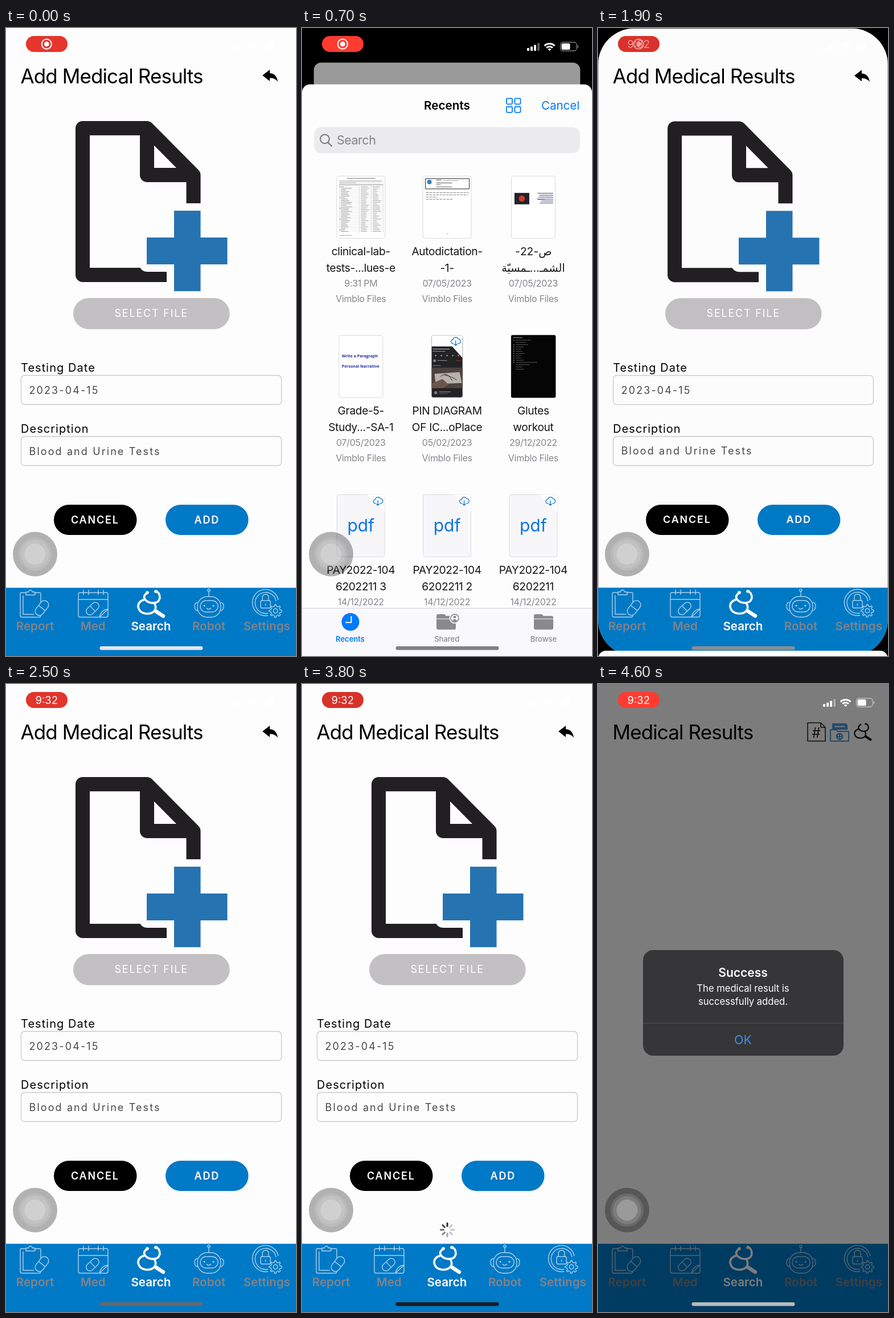
Write an HTML page with a canvas that moves like this. It is 509 px wide and 1100 px high and loops after 4.7 s.

```html
<!DOCTYPE html>
<html lang="en">
<head>
<meta charset="utf-8">
<title>Medical results</title>
<style>
  html, body { margin: 0; width: 100%; height: 100%; overflow: hidden; background: #fefdfe; }
  canvas { display: block; width: 100vw; height: 100vh; }
</style>
</head>
<body>
<canvas id="stage"></canvas>
<script>
const W = 509, H = 1100, LOOP = 4700;
const FONT = "Inter, 'DejaVu Sans', sans-serif";
const PAPER = '#fefdfe', BLUE = '#0079c6', LINK = '#007aff', GREY = '#8a898d';

const canvas = document.getElementById('stage');
const ctx = canvas.getContext('2d');
const dpr = window.devicePixelRatio || 1;
canvas.width = Math.round(W * dpr);
canvas.height = Math.round(H * dpr);

// ---------- helpers ----------
const clamp = v => Math.max(0, Math.min(1, v));
const mix = (a, b, u) => a + (b - a) * u;
const easeInOut = u => u < 0.5 ? 2 * u * u : 1 - 2 * (1 - u) ** 2;
const noise = i => { const v = Math.sin(i * 12.9898) * 43758.5453; return v - Math.floor(v); };
const spring = ms => ms <= 0 ? 0 : 1 - (1 + 0.017 * ms) * Math.exp(-0.017 * ms);

function keyed(t, keys, ease = u => u) {
  for (let i = 1; i < keys.length; i++) {
    const [t0, v0] = keys[i - 1], [t1, v1] = keys[i];
    if (t < t1) return mix(v0, v1, ease(clamp((t - t0) / (t1 - t0))));
  }
  return keys[keys.length - 1][1];
}

function text(str, x, y, size, { color = '#000', weight = 400, align = 'left', gap = 0, font = FONT } = {}) {
  ctx.font = `${weight} ${size}px ${font}`;
  ctx.letterSpacing = gap + 'px';
  ctx.textAlign = align;
  ctx.fillStyle = color;
  ctx.fillText(str, x, y);
}

function paint(path, fill, stroke, lw = 1) {
  if (fill) { ctx.fillStyle = fill; ctx.fill(path); }
  if (stroke) { ctx.strokeStyle = stroke; ctx.lineWidth = lw; ctx.stroke(path); }
}
const shape = (d, fill, stroke, lw) => paint(new Path2D(d), fill, stroke, lw);

function box(x, y, w, h, r, fill, stroke, lw) {
  const p = new Path2D();
  p.roundRect(x, y, w, h, r);
  paint(p, fill, stroke, lw);
}

function disc(x, y, r, fill, stroke, lw) {
  const p = new Path2D();
  p.arc(x, y, r, 0, 7);
  paint(p, fill, stroke, lw);
}

function bar(x, y, w, color, h = 1) {
  ctx.fillStyle = color;
  ctx.fillRect(x, y, w, h);
}

function at(x, y, scale, angle, draw) {
  ctx.save();
  ctx.translate(x, y);
  ctx.scale(scale, scale);
  ctx.rotate(angle);
  draw();
  ctx.restore();
}

// ---------- app screens ----------
function scopeIcon(x, y, scale, color) {
  at(x, y, scale, 0, () => {
    ctx.lineCap = ctx.lineJoin = 'round';
    shape('M-8 -19Q-15 -14 -11 -8Q-5 -1 5 -2Q14 -3 15 -11Q15 -20 8 -23', null, color, 3.6);
    shape('M-12 -8Q-24 -4 -23 5Q-21 16 -8 17Q3 17 7 10Q9 4 5 -2', null, color, 3.6);
    shape('M7 12L21 21', null, color, 6.5);
    disc(-7, -20, 2.8, color);
    disc(8, -22, 2.8, color);
    ctx.lineCap = 'butt';
  });
}

function tabBar() {
  const line = '#a9d0ea', lw = 1.4;
  bar(0, 980.5, W, BLUE, 120);

  shape('M35 989H27Q25 989 25 991V1029Q25 1032 28 1032H58Q61 1032 61 1029V991Q61 989 59 989H51', null, line, lw);
  shape('M35 993V988H39Q43 981 47 988H51V993Z', null, line, lw);
  shape('M30 994V1027H49', null, line, lw);
  at(63, 1016, 1, -0.9, () => {
    box(-14.5, -7.5, 29, 15, 7.5, BLUE, line, lw);
    shape('M0 -7V7', null, line, lw);
  });

  box(127, 989, 52, 43, 3, null, line, lw);
  shape('M127 1001H179M136 984V993M145 984V993M162 984V993M171 984V993M179 1018L164 1032Q167 1019 179 1018', null, line, lw);
  at(152, 1017, 1, -0.75, () => {
    box(-13, -6.5, 26, 13, 6.5, null, line, lw);
    shape('M0 -6V6', null, line, lw);
  });

  scopeIcon(255, 1009, 1, '#fff');

  disc(356, 985, 2, null, line, lw);
  box(336, 996, 41, 36, 17, null, line, lw);
  box(341, 1003, 31, 20, 10, null, line, lw);
  shape('M356 987V996M336 1006Q331 1007 331 1013T336 1021M377 1006Q382 1007 382 1013T377 1021M352 1016Q356 1020 360 1016', null, line, lw);
  disc(348, 1012, 1.6, line);
  disc(364, 1012, 1.6, line);

  shape('M478 1002A23 23 0 1 0 460 1029M474 1004A18.5 18.5 0 1 0 460 1025', null, line, lw);
  box(447, 1003, 17, 13, 2, null, line, lw);
  shape('M450 1003V998Q450 992 455.500 992T461 998V1003M455.500 1008V1012', null, line, lw);
  at(473, 1021, 1, 0, () => {
    const gear = new Path2D();
    for (let i = 0; i <= 64; i++) {
      const a = i / 64 * Math.PI * 2, r = Math.cos(a * 8) > 0 ? 11 : 8.3;
      gear.lineTo(r * Math.cos(a), r * Math.sin(a));
    }
    paint(gear, BLUE, line, lw);
    disc(0, 0, 3.8, null, line, lw);
  });

  ['Report', 'Med', 'Search', 'Robot', 'Settings'].forEach((name, i) =>
    text(name, 51 + i * 101.7, 1055, 20.6, { weight: 600, align: 'center', color: i === 2 ? '#fff' : '#80838a' }));
}

function fileIcon() {
  ctx.lineJoin = 'round';
  shape('M282 432.500H134.500V175.500H247.500L329 257.500V307M247.500 175.500V257.500H329', null, '#221f22', 25);
  shape('M235 419Q239 427 248 427H284V419Z', PAPER);
  bar(295, 320, 46.5, '#2673b2', 141);
  bar(247, 367, 141.5, '#2673b2', 47);
}

function field(label, value, y) {
  text(label, 26, y - 6, 20, { gap: 1.05 });
  box(26.5, y + 0.5, 457, 51, 6, null, '#c9c8cc', 1.3);
  text(value, 40.5, y + 32.5, 18, { gap: 2.1, color: '#48474a' });
}

function spinner(t) {
  const head = 6 + Math.floor((t - 3000) / 80);
  ctx.lineCap = 'round';
  for (let i = 0; i < 8; i++) {
    const age = (((head - i) % 8) + 8) % 8;
    const tone = Math.round(mix(45, 195, Math.min(1, age / 5)));
    at(255, 956, 1, i * Math.PI / 4, () => shape('M0 -6.500V-11.500', null, `rgb(${tone},${tone},${tone})`, 3));
  }
  ctx.lineCap = 'butt';
}

const screenTitle = str => text(str, 25.5, 96.5, 35, { gap: -0.9 });

function formScreen(t) {
  bar(0, 0, W, PAPER, H);
  screenTitle('Add Medical Results');
  shape('M450 83L463 73V79Q475 80 477 94Q472 87 463 87.500V93Z', '#000');
  fileIcon();
  box(118, 473, 274.5, 54.5, 27, '#c2c0c3');
  text('SELECT FILE', 190.5, 506, 18, { gap: 1.8, color: '#fff' });
  field('Testing Date', '2023-04-15', 608);
  field('Description', 'Blood and Urine Tests', 715);

  box(84, 835, 145.5, 53, 26.5, '#000');
  text('CANCEL', 114, 867.5, 18, { gap: 1.8, weight: 600, color: '#fff' });
  ctx.save();
  ctx.globalAlpha = keyed(t, [[2650, 1], [2800, 0.2], [3100, 1]], easeInOut);
  box(280, 835, 145.5, 53, 26.5, BLUE);
  text('ADD', 330.5, 867.5, 18, { gap: 1.8, weight: 600, color: '#fff' });
  ctx.restore();

  if (t >= 2900) spinner(t);
  tabBar();
}

function resultsScreen(t) {
  bar(0, 0, W, PAPER, H);
  screenTitle('Medical Results');

  shape('M368 68H391L399 76V100H368ZM391 68V76H399', null, '#222', 1.6);
  text('#', 383, 94, 24, { align: 'center', color: '#222', font: `${FONT}` });
  const blue = '#4599d6';
  shape('M411 80V69H435L438 72V80Z', blue);
  shape('M415 74.500H433', null, PAPER, 2);
  shape('M408 80H418L421 83H440V100H408Z', null, blue, 2);
  disc(424, 92, 5, null, blue, 2.4);
  shape('M424 88V96M420 92H428', null, blue, 2);
  scopeIcon(465, 84, 0.64, '#1c1a1c');
  tabBar();

  const u = clamp((t - 3950) / 250), a = 1 - (1 - u) ** 3;
  bar(0, 0, W, `rgba(0,0,0,${0.51 * a})`, H);
  ctx.save();
  ctx.globalAlpha = a;
  at(254.5, 558.5, mix(1.15, 1, a), 0, () => {
    ctx.translate(-254.5, -558.5);
    box(79, 466, 352, 185, 18, '#363537');
    const c = { align: 'center', color: '#fff' };
    text('Success', 254.5, 512.5, 21, { ...c, weight: 600 });
    text('The medical result is', 254.5, 539, 16.6, c);
    text('successfully added.', 254.5, 562, 16.6, c);
    bar(79, 593.5, 352, '#59585b');
    text('OK', 254.5, 630.5, 21.5, { ...c, color: '#3f8fe9' });
  });
  ctx.restore();
}

// ---------- file picker ----------
const FILES = [
  ['clinical-lab-', 'tests-...lues-e', '9:31 PM'],
  ['Autodictation-', '-1-', '07/05/2023'],
  ['ص-22-', 'الشمـ...ـمسيّة', '07/05/2023'],
  ['Grade-5-', 'Study...-SA-1', '07/05/2023'],
  ['PIN DIAGRAM', 'OF IC...oPlace', '05/02/2023'],
  ['Glutes', 'workout', '29/12/2022'],
  ['PAY2022-104', '6202211 3', '14/12/2022'],
  ['PAY2022-104', '6202211 2', '14/12/2022'],
  ['PAY2022-104', '6202211', '14/12/2022']
];

// Thumbnails are drawn around x = 0 with y from 0 to 110.
const frame = (w, fill) => box(-w / 2, 0.5, w, 109, 4, fill, '#d9d8dc', 1);

function cloud(x, y) {
  at(x, y, 1, 0, () => {
    ctx.lineCap = 'round';
    shape('M-4 4H-4.500a3.500 3.500 0 0 1 0 -7a4.800 4.800 0 0 1 9 -1.500a4.300 4.300 0 0 1 .5 8.500H4M0 -1V7.500M-2.500 5L0 7.500L2.500 5', null, '#1b7fd6', 1.4);
    ctx.lineCap = 'butt';
  });
}

function labThumb() {
  frame(85, '#fff');
  bar(-25, 4, 50, '#777');
  for (let i = 0; i < 3; i++) bar(-38, 8 + i * 2, i < 2 ? 75 : 30, '#bbb');
  bar(-38, 14, 77, '#cfcfcf', 3);
  for (let i = 0; i < 30; i++) {
    const y = 18 + i * 2.7;
    bar(-38, y, 77, '#e2e2e2', 0.6);
    bar(i % 7 ? -35 : -38, y + 0.8, 8 + 12 * noise(i), '#a2a2a2');
    bar(0, y + 0.8, 8 + 7 * noise(i + 40), '#b2b2b2');
    bar(21, y + 0.8, 6 + 9 * noise(i + 80), '#b2b2b2');
  }
  [-38, -3, 18, 39].forEach(x => bar(x, 14, 0.7, '#d0d0d0', 86));
  bar(-38, 104, 22, '#aaa');
}

function dictationThumb() {
  frame(85, '#fff');
  box(-38, 5, 77, 18, 0, null, '#222', 1);
  disc(-31, 11, 4, '#2f83b8');
  bar(-19, 7, 9, '#555');
  bar(-8, 8, 28, '#777', 0.7);
  bar(-19, 12, 28, '#555');
  bar(-19, 15, 8, '#666');
  bar(-19, 19, 28, '#666');
  [75, 74, 20, 48].forEach((w, i) => {
    for (let x = 0; x < w; x += 6) bar(-37 + x, 29 + i * 3.9, Math.min(4.7, w - x), '#808080');
  });
  bar(0, 101, 2, '#888');
}

function sunThumb() {
  frame(77, '#fff');
  bar(-33, 30, 26, '#252127', 20);
  disc(-20, 40, 5.5, '#c23a30');
  for (let i = 0; i < 6; i++) {
    const w = 18 + 17 * noise(i + 3);
    bar(35 - w, 30 + i * 3.4, w, i % 2 ? '#6268a8' : '#6f6970', 1.3);
  }
  bar(8, 41, 12, '#c55');
}

function paragraphThumb() {
  frame(77, '#fff');
  const style = { weight: 700, color: '#2a2f9e', font: "'Open Sans', sans-serif" };
  text('Write a Paragraph', -33.5, 39, 7, style);
  text('Personal Narrative', -33.5, 57, 7, style);
}

function videoThumb() {
  box(-27.5, 0.5, 55, 109, 3, '#232225', '#d9d8dc', 1);
  shape('M-27 1H27V40L9 20H-27Z', '#fdfdfe');
  bar(-25, 24, 30, '#a8a8a8', 1.2);
  bar(-25, 28, 22, '#8a8a8a', 1.2);
  for (let i = 0; i < 5; i++) disc(-20 + i * 10, 36, 1.3, '#999');
  disc(-22, 45, 2.4, '#8a8a8a');
  bar(-17, 44, 17, '#999');
  bar(16, 44, 8, '#a03030', 1.2);
  bar(-25, 53, 14, '#888');
  bar(-27, 57, 54, '#4d423e', 36);
  shape('M-22 68L22 65L26 84L-20 86Z', '#b9b2ac');
  shape('M-27 85L-8 77L3 87L-7 93H-27Z', '#6d554b');
  shape('M-12 73Q0 62 9 80M-5 70Q10 73 17 79', null, '#383136', 1);
  disc(-20, 101, 2.8, '#777');
  bar(-14, 99, 20, '#999');
  bar(-14, 102, 15, '#666');
  cloud(15, 11);
}

function listThumb() {
  box(-39, 0, 78.5, 110, 3, '#050506');
  bar(-35, 4, 16, '#888', 1.2);
  for (let i = 0; i < 14; i++) {
    const y = 8.5 + i * 3.9;
    if (i !== 1 && i < 11) disc(-34, y + 0.5, 1, '#777');
    bar(-31, y, 9 + 30 * noise(i + 20) ** 2, '#565658');
  }
}

function pdfThumb() {
  frame(84, '#f7f7fa');
  shape('M11 0.500H38Q42 0.500 42 4.500V31Z', '#fefeff');
  text('pdf', 0, 65, 30, { align: 'center', color: '#0b74e5' });
  cloud(30, 12);
}

const THUMBS = [labThumb, dictationThumb, sunThumb, paragraphThumb, videoThumb, listThumb, pdfThumb, pdfThumb, pdfThumb];

function folder(x) {
  box(x - 17, 1027, 16, 10, 3, GREY);
  box(x - 17, 1030, 34, 24, 3, GREY);
  bar(x - 17, 1034.5, 34, '#d6d5d9', 1.5);
}

function pickerBar() {
  bar(0, 1016, W, '#f9f8fb', 200);
  bar(0, 1016, W, '#d2d1d6', 1);
  disc(85, 1040.500, 15.5, LINK);
  ctx.lineCap = 'round';
  shape('M86.500 1031V1041.500H77', null, '#fff', 2);
  ctx.lineCap = 'butt';
  folder(253);
  disc(268, 1034, 9.5, '#f9f8fb');
  disc(268, 1034, 7, null, GREY, 1.6);
  disc(268, 1032, 2.4, GREY);
  shape('M263.500 1038.500Q268 1033 272.500 1038.500Q268 1042 263.500 1038.500Z', GREY);
  folder(424);
  ['Recents', 'Shared', 'Browse'].forEach((name, i) =>
    text(name, 84.5 + i * 169.7, 1075, 13, { weight: i ? 500 : 600, align: 'center', color: i ? GREY : LINK }));
}

function picker(top) {
  ctx.save();
  ctx.translate(0, top - 99);
  box(0, 99, W, 1150, [14, 14, 0, 0], PAPER);
  text('Recents', 254.5, 143, 20.7, { weight: 600, align: 'center' });
  for (let i = 0; i < 4; i++)
    box(359 + (i % 2) * 14.5, 123.500 + (i >> 1) * 14.5, 10, 10, 1.5, null, LINK, 1.8);
  text('Cancel', 420, 143, 20.5, { color: LINK });

  box(21, 174, 467, 45.5, 13, '#ebeaec');
  disc(40, 194.500, 7.8, null, '#77767b', 2);
  shape('M45.500 200.500L52.500 207.500', null, '#77767b', 2.2);
  text('Search', 61, 204, 21.5, { gap: -0.5, color: '#838287' });

  FILES.forEach(([first, second, date], i) => {
    const x = 103.3 + (i % 3) * 151.3, y = 259 + Math.floor(i / 3) * 279;
    at(x, y, 1, 0, THUMBS[i]);
    const rtl = i === 2;
    ctx.direction = rtl ? 'rtl' : 'ltr';
    const name = { align: 'center', color: '#161618', gap: rtl ? 0 : -0.35 };
    text(first, x, y + 139, 19.2, name);
    text(second, x, y + 168, 19.2, name);
    ctx.direction = 'ltr';
    const note = { align: 'center', color: '#87868b', gap: -0.3 };
    text(date, x, y + 194.5, 16, note);
    text('Vimblo Files', x, y + 221, 16, note);
  });
  pickerBar();
  ctx.restore();
}

// ---------- system overlays ----------
function statusBar(t) {
  for (let i = 0; i < 4; i++) {
    const h = [5, 7.5, 10.5, 14][i];
    box(395 + i * 6, 40 - h, 4, h, 1, i < 3 ? '#fff' : 'rgba(255,255,255,.35)');
  }
  for (const [r0, r1] of [[0, 4], [6, 9], [11, 14]]) {
    const p = new Path2D();
    p.arc(434.5, 40, r1, -2.36, -0.78);
    p.arc(434.5, 40, r0, -0.78, -2.36, true);
    paint(p, '#fff');
  }
  box(453.5, 25, 28.5, 15, 4.5, null, 'rgba(255,255,255,.5)', 1.3);
  box(455.5, 27, 15, 11, 2.5, '#fff');
  box(483.5, 30, 1.6, 5, 1, 'rgba(255,255,255,.5)');

  const glow = keyed(t, [[0, 0.35], [700, 1], [1500, 0], [1900, 0.05], [2200, 0], [3000, 1], [3800, 0], [4600, 1], [5400, 0]], easeInOut);
  box(35, 14, 73, 28, 14, `rgb(${mix(215, 255, glow)},${mix(50, 59, glow)},${mix(42, 48, glow)})`);
  const swap = clamp((t - 1800) / 200);
  ctx.save();
  ctx.globalAlpha = 1 - swap;
  disc(71.3, 28.2, 8.6, null, '#fff', 2);
  disc(71.3, 28.2, 4.4, '#fff');
  ctx.globalAlpha = swap;
  text('9:32', 71.3, 34.5, 18.5, { align: 'center', color: '#fff' });
  ctx.restore();
}

function touchButton() {
  disc(51, 921.5, 39, 'rgba(0,0,0,.3)');
  disc(51, 921.5, 29, 'rgba(255,255,255,.12)');
  disc(51, 921.5, 24.5, 'rgba(255,255,255,.12)');
  disc(51, 921.5, 18.5, 'rgba(255,255,255,.22)');
}

function homeIndicator(t) {
  const v = keyed(t, [[300, 228], [700, 128], [1500, 92], [1900, 140], [3000, 75], [3800, 28], [4200, 170], [4600, 185]]);
  box(164.5, 1083, 181, 6.5, 3.2, `rgb(${v},${v + 1},${v + 3})`);
}

function draw(t) {
  ctx.setTransform(canvas.width / W, 0, 0, canvas.height / H, 0, 0);
  ctx.clearRect(0, 0, W, H);

  const open = t < 1503 ? spring(t - 371) : 1 - spring(t - 1503);
  if (t >= 3900) {
    resultsScreen(t);
  } else if (open < 0.001) {
    formScreen(t);
  } else {
    bar(0, 0, W, '#000', H);
    ctx.save();
    ctx.translate(W / 2, 62 * open);
    ctx.scale(1 - 0.083 * open, 1 - 0.083 * open);
    ctx.translate(-W / 2, 0);
    ctx.beginPath();
    ctx.roundRect(0, 0, W, H, mix(64, 14, open));
    ctx.clip();
    formScreen(t);
    bar(0, 0, W, `rgba(0,0,0,${0.4 * open})`, H);
    ctx.restore();
    picker(mix(H, 74, open));
  }

  statusBar(t);
  touchButton();
  homeIndicator(t);
}

const start = performance.now();
function tick() {
  draw((performance.now() - start) % LOOP);
  requestAnimationFrame(tick);
}
tick();
</script>
</body>
</html>
```
